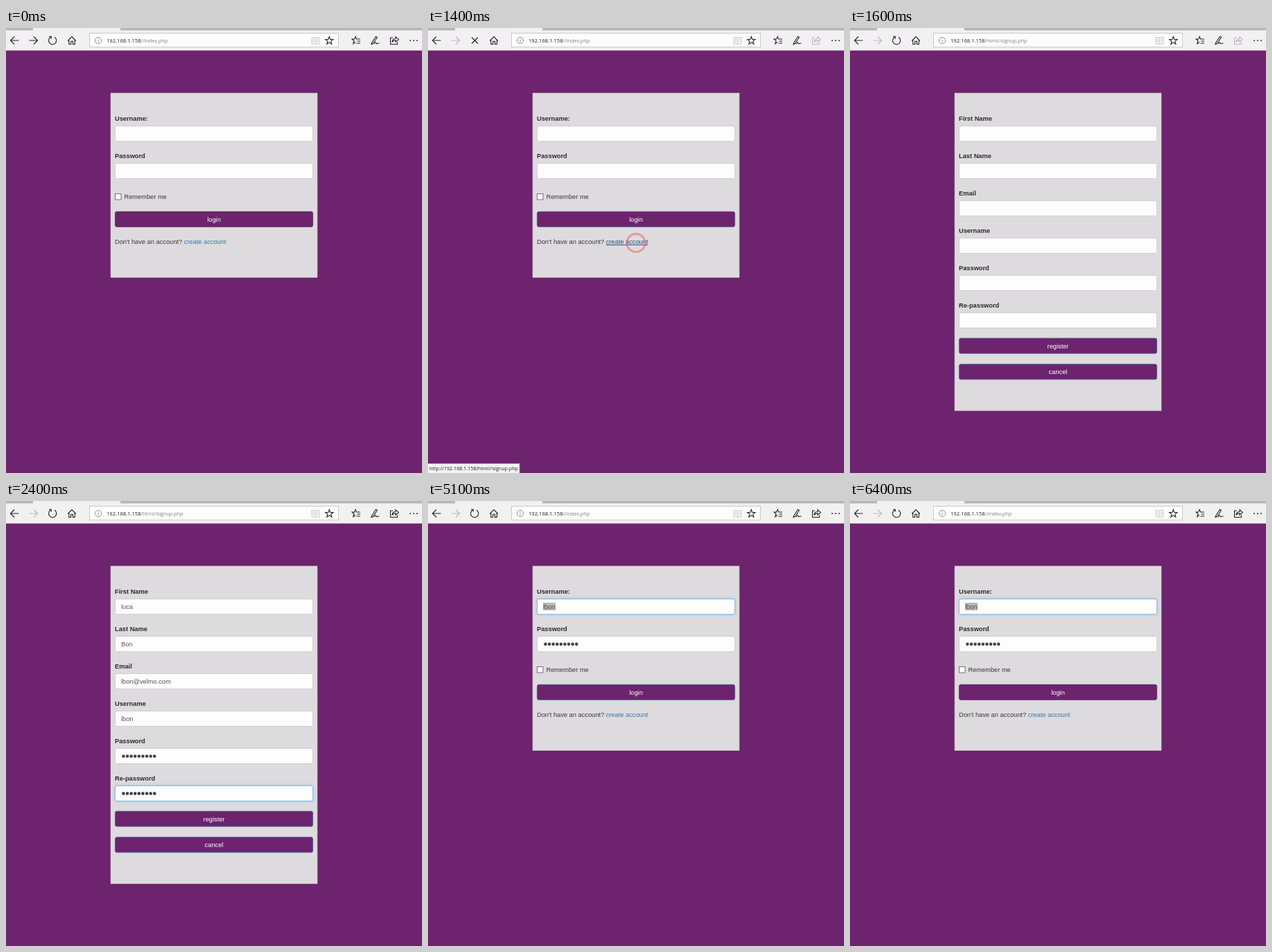
Recreate the animation shown at these times as an HTML page. Size 600 by 643 pixels, loop 8 s.

```html
<!DOCTYPE html>
<html lang="en">
<head>
<meta charset="utf-8">
<title>Sign-up form</title>
<style>
html, body { margin: 0; width: 100%; height: 100%; overflow: hidden; background: #6d236d; }
svg { display: block; width: 600px; height: 643px; }
text { font: 9.28px "Liberation Sans", Arial, sans-serif; fill: #3a393a; white-space: pre; }
.label { font-weight: bold; fill: #2c2b2c; }
.value { fill: #555; }
.panel { fill: #dddbdd; stroke: #c9bfc9; stroke-width: .6; }
.input { fill: #fefdfe; stroke: #c8c6c8; stroke-width: .8; }
.input.focus { stroke: #66afe9; filter: drop-shadow(0 0 2px #66afe999); }
.button { fill: #6d236d; stroke: #3d5f98; stroke-width: .8; }
.button.hover { stroke: #4d2c66; }
.caption { fill: #fff; text-anchor: middle; }
.link { fill: #337ab7; }
.link.hover { fill: #23527c; text-decoration: underline; }
.bar text { font: 7.6px "Open Sans", "Noto Sans", sans-serif; fill: #222; }
.bar .path { fill: #858385; letter-spacing: -.2px; }
.bar #status text { font-size: 7.15px; }
.icon { fill: none; stroke: #222; stroke-width: 1.1; }
.off { stroke: #b9b7b9; }
</style>
</head>
<body>
<svg viewBox="0 0 600 643">
  <rect width="600" height="643" fill="#6d236d"/>
  <g id="login"></g>
  <g id="signup"></g>
  <g class="bar">
    <rect width="600" height="32.5" fill="#f2f0f2"/>
    <path d="M0 0H39V3.5H0zM165 0H600V3.5H165z" fill="#b9b6b9"/>
    <rect id="menuHover" x="575" y="4" width="25" height="28" fill="#dcdadc"/>
    <rect x="120.5" y="7.5" width="359" height="20" fill="#fefdfe" stroke="#cac8ca"/>
    <text x="145" y="21">192.168.1.158<tspan class="path" id="path"></tspan></text>
    <g class="icon">
      <path d="M18.5 18H6.5M12 12.5L6.5 18L12 23.5"/>
      <path id="forward" d="M33.5 18H45.5M40 12.5L45.5 18L40 23.5"/>
      <path id="reload" d="M70 13.3A5.6 5.6 0 1 1 64.3 13.3M62.3 12.4H65.3V15.6"/>
      <path id="stop" d="M63 13.5L72 22.5M72 13.5L63 22.5"/>
      <path d="M89.2 18.5L95 12.5L100.8 18.5M90.8 17V23.5H93.7V19.3H96.5V23.5H99.3V17"/>
      <g stroke="#777" stroke-width=".8">
        <circle cx="133" cy="18" r="4.6"/>
        <path d="M133 17V20.5M133 15V16"/>
      </g>
      <path class="off" d="M446.5 14V23.5M441 13.5H445L446.5 14.5L448 13.5H452V23H441zM442.5 16H445M442.5 18H445M442.5 20H445M448 16H450.5M448 18H450.5M448 20H450.5" stroke-width=".8"/>
      <polygon id="star"/>
      <path d="M504 20.5L500.8 22.7L502 18.4L499 16H502.7L504.2 12.4L505.7 16H511M506.5 19H511M505.5 22H511"/>
      <path d="M527.5 21.5L533.5 12.3L535.4 13.5L529.5 22.5L527 23.5zM531 23C533 19.5 534 20 534 22.5C535 23.7 536 21.5 538.5 22"/>
      <path id="share" d="M558 14H554.5V23.5H564.5V20.5M556.8 20.5C557.2 17 559 15.5 562 15.5V12.7L566.3 16.5L562 20.3V17.7C559.5 17.7 558 18.5 556.8 20.5z"/>
    </g>
    <path d="M582.2 17.3h1.6v1.6h-1.6zM587.2 17.3h1.6v1.6h-1.6zM592.2 17.3h1.6v1.6h-1.6z" fill="#222"/>
    <g id="status">
      <rect x="-.5" y="629.5" width="132.5" height="15" fill="#f4f2f4" stroke="#aaa8aa"/>
      <text x="2" y="639">http://192.168.1.158/html//signup.php</text>
    </g>
  </g>
  <circle id="ring" cx="300" cy="310.5" fill="none" stroke="#e85a5a" stroke-width="3"/>
</svg>
<script>
const $ = id => document.getElementById(id);
const show = (id, on) => { $(id).style.display = on ? '' : 'none'; };

const text = (x, y, cls, str) => `<text x="${x}" y="${y}" class="${cls}">${str}</text>`;
const box = (cls, y, id = '') =>
  `<rect ${id && `id="${id}"`} class="${cls}" x="157.4" y="${y}" width="285.2" height="22" rx="2.5"/>`;
const panel = h => `<rect class="panel" x="151" y="94" width="298" height="${h}"/>`;
const button = (y, label, id) => box('button', y, id) + text(300, y + 14.4, 'caption', label);
const rowY = row => 141.7 + row * 53.95;
const field = (label, row, id) =>
  text(157, rowY(row) - 7.7, 'label', label) + box('input', rowY(row), id);
const value = (str, row) => text(166, rowY(row) + 14.2, 'value', str);
const dots = row => Array.from({ length: 9 }, (_, i) =>
  `<circle cx="${169.4 + i * 5.6}" cy="${rowY(row) + 11.2}" r="2.3" fill="#464546"/>`).join('');

$('login').innerHTML = panel(266.5) +
  field('Username:', 0, 'user') + field('Password', 1) +
  '<rect x="157.5" y="239.5" width="8.5" height="8.5" fill="#fff" stroke="#666" stroke-width=".9"/>' +
  text(170.5, 247, '', 'Remember me') +
  button(265.3, 'login', 'loginButton') +
  '<text x="157" y="312">Don\'t have an account? <tspan id="link" class="link">create account</tspan></text>' +
  '<g id="saved"><rect x="166" y="147" width="18.2" height="11" fill="#b8b6b8"/>' +
  value('lbon', 0) + dots(1) + '</g>';

$('signup').innerHTML = panel(459) +
  ['First Name', 'Last Name', 'Email', 'Username', 'Password', 'Re-password']
    .map((label, i) => field(label, i, 'field' + i)).join('') +
  button(448.2, 'register') + button(485.8, 'cancel') +
  '<g id="filled">' +
  ['luca', 'Bon', 'lbon@velmo.com', 'lbon'].map(value).join('') + dots(4) + dots(5) + '</g>';

$('star').setAttribute('points', Array.from({ length: 10 }, (_, i) => {
  const r = i % 2 ? 2.5 : 6, a = (i / 5 - .5) * Math.PI;
  return [466.3 + r * Math.cos(a), 18.4 + r * Math.sin(a)];
}).join(' '));

function draw(now) {
  const t = now % 8000;
  const within = (from, to) => t >= from && t < to;
  const signup = within(1500, 5100), filled = within(2400, 5100), back = t >= 5100;
  const loading = within(1200, 1500);

  show('login', !signup);
  show('signup', signup);
  show('filled', filled);
  show('saved', back);
  show('status', within(1100, 1500));
  show('reload', !loading);
  show('stop', loading);
  show('menuHover', within(5600, 5700));
  $('path').textContent = signup ? '/html//signup.php' : '//index.php';

  $('user').classList.toggle('focus', back);
  $('field5').classList.toggle('focus', filled);
  $('link').classList.toggle('hover', within(600, 1500));
  $('loginButton').classList.toggle('hover', t < 300 || t >= 6400);
  $('forward').classList.toggle('off', t >= 1200);
  $('share').classList.toggle('off', within(1200, 2400));

  // The click ring grows and fades in 100 ms steps.
  const step = Math.floor((t - 1100) / 100);
  show('ring', within(1100, 1600));
  $('ring').setAttribute('r', Math.max(0, 2 + 3.7 * step));
  $('ring').setAttribute('opacity', Math.min(.8, 1.55 - .35 * step));

  requestAnimationFrame(draw);
}
draw(performance.now());
</script>
</body>
</html>
```
